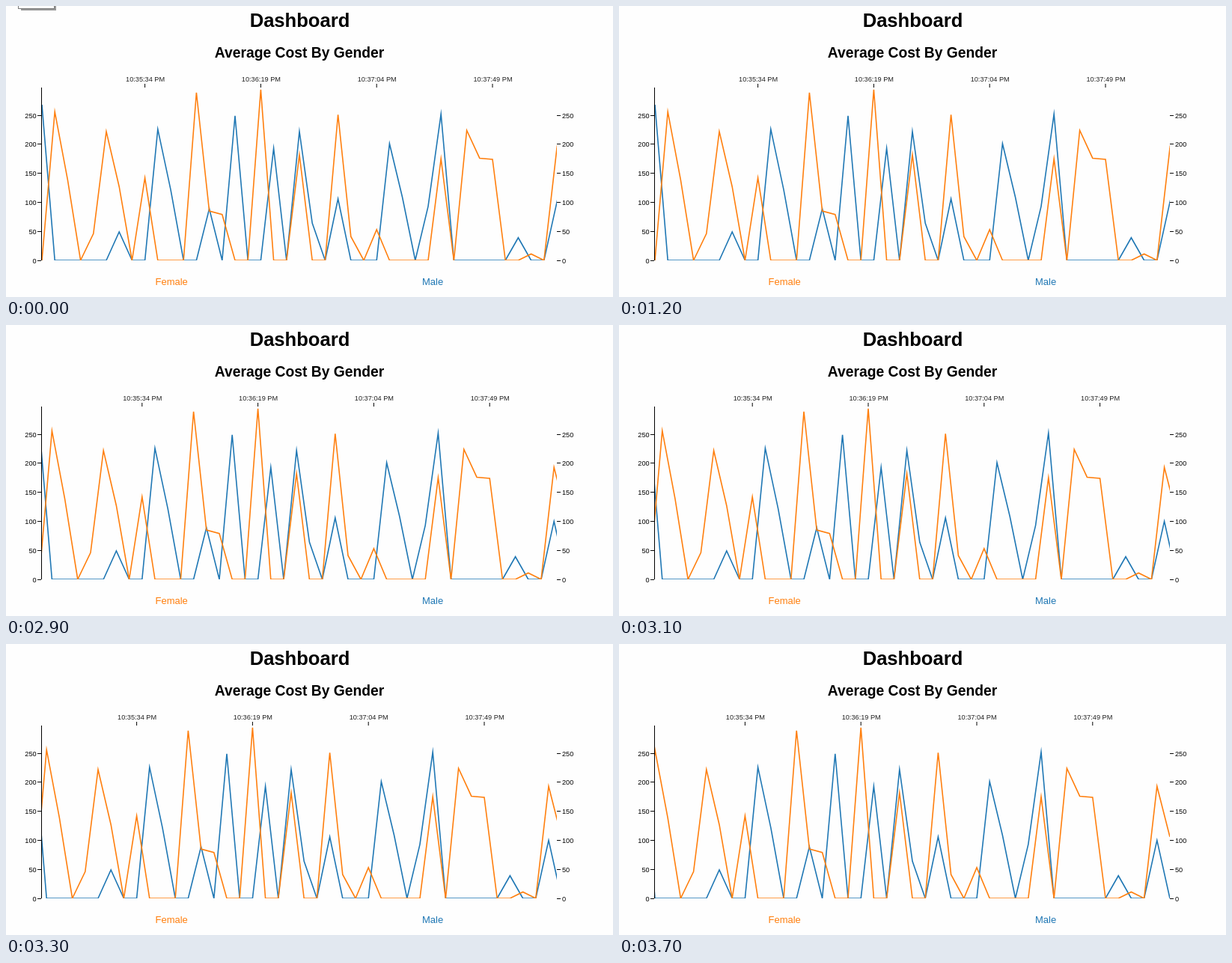
An HTML page that plays this animation: 811x389 px, repeating every 4.4 s.

```html
<!DOCTYPE html>
<html lang="en">
<head>
<meta charset="utf-8">
<title>Dashboard</title>
<style>
html, body { margin: 0; width: 100%; height: 100%; overflow: hidden; background: #fefefe; }
svg { display: block; width: 811px; height: 389px; font-family: Arial, "Liberation Sans", sans-serif; }
.title { font-size: 25.6px; font-weight: bold; text-anchor: middle; }
.subtitle { font-size: 19.3px; font-weight: bold; text-anchor: middle; }
.legend { font-size: 13px; }
.axis { font-size: 9.2px; }
.axis path { stroke: #000; fill: none; }
.left { text-anchor: end; }
.time { text-anchor: middle; fill: #222; }
.series { fill: none; stroke-width: 1.6; stroke-miterlimit: 10; }
.tip { animation: tip 4400ms step-end infinite; }
@keyframes tip {
  0% { visibility: visible; }
  22.72%, 100% { visibility: hidden; }
}
</style>
</head>
<body>
<svg viewBox="0 0 811 389">
  <defs><clipPath id="plot"><rect x="48" y="100" width="688" height="240"/></clipPath></defs>
  <g class="tip">
    <rect x="20" y="0" width="47" height="6" fill="#999"/>
    <rect x="16.5" y="-5" width="48" height="8.5" fill="#fff" stroke="#777"/>
  </g>
  <text class="title" x="392.5" y="28">Dashboard</text>
  <text class="subtitle" x="392" y="69">Average Cost By Gender</text>
  <g class="axis"><path d="M47.5 109V340"/></g>
  <g clip-path="url(#plot)">
    <g class="slide">
      <path id="male" class="series" stroke="#1f77b4"/>
      <path id="female" class="series" stroke="#ff7f0e"/>
    </g>
  </g>
  <g id="values" class="axis"></g>
  <g id="times" class="axis slide"></g>
  <text class="legend" x="199.5" y="373" fill="#ff7f0e">Female</text>
  <text class="legend" x="556" y="373" fill="#1f77b4">Male</text>
</svg>
<script>
const LEFT = 48, STEP = 17.2, LAST = 41, LOOP = 4400;
const $ = id => document.getElementById(id);
const xAt = i => LEFT + i * STEP;
const yAt = cost => 340 - cost * 0.776;

// Costs by sample index; other samples are zero, and a fading peak takes two samples to fall.
function drawSeries(id, costs, fading) {
  for (const i of fading) costs[i + 1] = costs[i] * 0.54;
  const points = Array.from({ length: LAST + 1 }, (_, i) => `${xAt(i)} ${yAt(costs[i] ?? 0)}`);
  $(id).setAttribute("d", "M" + points.join("L"));
}
drawSeries("male", {
  0: 268, 6: 49, 9: 226, 13: 89, 15: 249, 18: 193, 20: 222, 21: 64,
  23: 106, 27: 201, 30: 93, 31: 252, 37: 39, 40: 100
}, [9, 27]);
drawSeries("female", {
  1: 256, 4: 46, 5: 222, 6: 127, 8: 142, 12: 289, 13: 85, 14: 79, 17: 294, 20: 182,
  23: 251, 24: 41, 26: 53, 31: 175, 33: 224, 34: 176, 35: 174, 38: 11, 40: 193, 41: 106
}, [1]);

let marks = "";
for (let v = 0; v <= 250; v += 50) {
  const y = Math.floor(yAt(v)) + 0.5;
  marks += `<path d="M42 ${y}h5M736 ${y}h5"/>
    <text class="left" x="40.7" y="${y + 3}">${v}</text>
    <text x="743" y="${y + 3}">${v}</text>`;
}
$("values").innerHTML = marks;

// One label every 45 seconds, nine samples apart, from 10:35:34.
let labels = "";
for (let i = 0; i < 4; i++) {
  const x = xAt(8 + 9 * i), secs = 35 * 60 + 34 + 45 * i;
  const clock = [Math.floor(secs / 60), secs % 60].map(n => String(n).padStart(2, "0")).join(":");
  labels += `<path d="M${x} 104v5"/><text class="time" x="${x + 0.5}" y="101.2">10:${clock} PM</text>`;
}
$("times").innerHTML = labels;

// The chart moves one sample to the left in ticks of 100 ms.
const sliding = document.querySelectorAll(".slide");
function draw(now) {
  const tick = Math.floor((now % LOOP) / 100) - 28;
  const shift = tick < 0 ? 0 : Math.min(STEP, 2 + 1.8 * tick);
  for (const g of sliding) g.setAttribute("transform", `translate(${-shift} 0)`);
  requestAnimationFrame(draw);
}
draw(performance.now());
</script>
</body>
</html>
```
